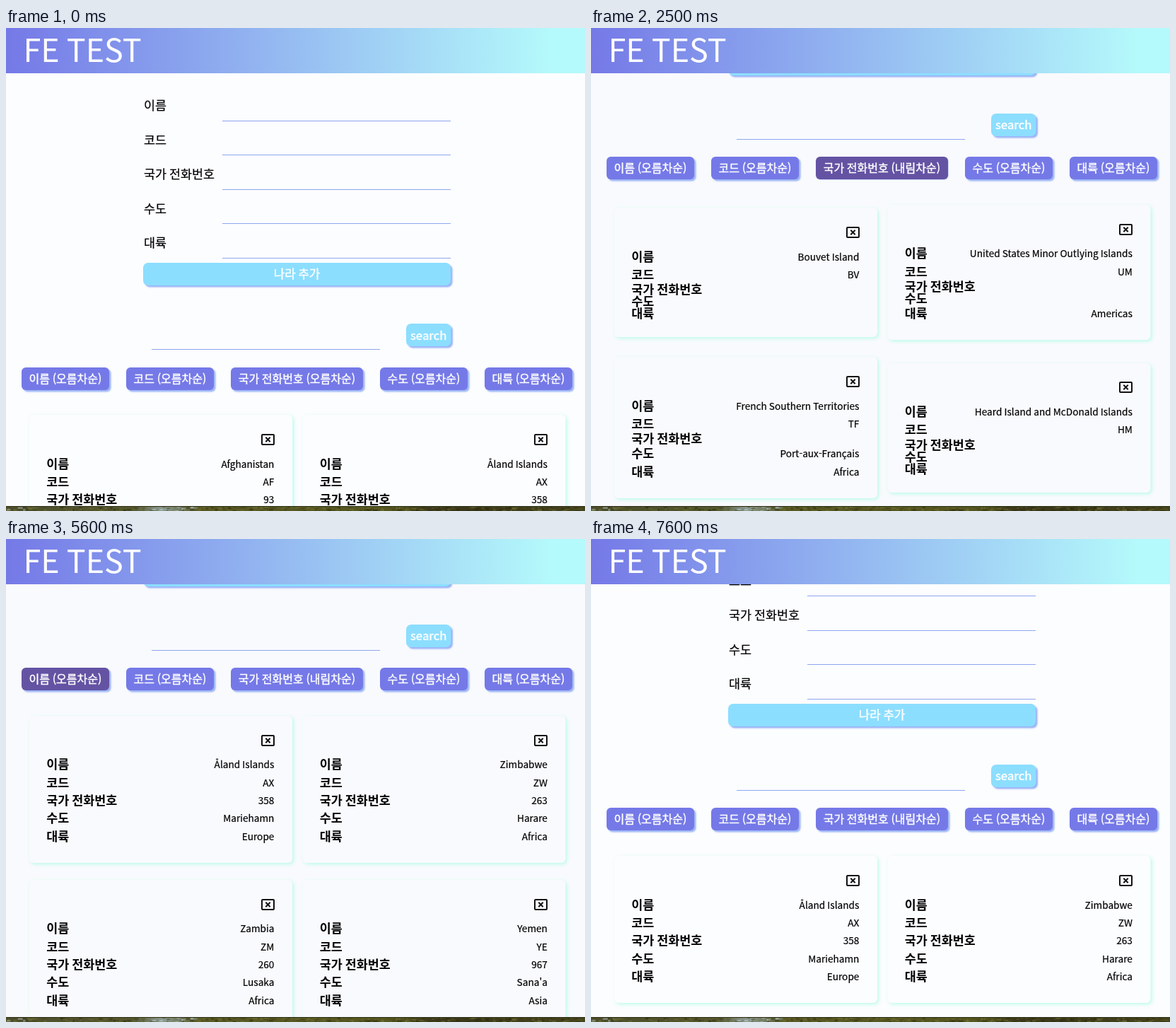
Write an HTML page with a canvas that moves like this. It is 819x683 px and loops after 8000 ms.

```html
<!DOCTYPE html>
<html lang="ko">
<head>
<meta charset="utf-8">
<title>FE TEST</title>
<style>
html, body { margin: 0; width: 100%; height: 100%; overflow: hidden; background: #fcfdff; }
canvas { display: block; }
</style>
</head>
<body>
<canvas id="stage" width="819" height="683"></canvas>
<script>
const ctx = document.getElementById('stage').getContext('2d');
const W = 819, H = 683, LOOP = 8000;
const FAMILY = '"Noto Sans CJK KR", "Noto Sans KR", "Noto Sans", sans-serif';
const LABELS = ['이름', '코드', '국가 전화번호', '수도', '대륙'];
const LINE = '#8ea6f0', SKY = '#8cdeff', BLUE = '#9ab3f5', VIOLET = '#7579e7', DARK = '#6453a3';
const MAX_SCROLL = 297.3;

const LISTS = {
  start: [
    ['Afghanistan', 'AF', '93', 'Kabul', 'Asia'],
    ['Åland Islands', 'AX', '358', 'Mariehamn', 'Europe'],
    ['Albania', 'AL', '355', 'Tirana', 'Europe'],
    ['Algeria', 'DZ', '213', 'Algiers', 'Africa']
  ],
  phoneUp: [
    ['Bouvet Island', 'BV', '', '', ''],
    ['United States Minor Outlying Islands', 'UM', '', '', 'Americas'],
    ['French Southern Territories', 'TF', '', 'Port-aux-Français', 'Africa'],
    ['Heard Island and McDonald Islands', 'HM', '', '', '']
  ],
  phoneDown: [
    ['Uzbekistan', 'UZ', '998', 'Tashkent', 'Asia'],
    ['Kyrgyzstan', 'KG', '996', 'Bishkek', 'Asia'],
    ['Georgia', 'GE', '995', 'Tbilisi', 'Asia'],
    ['Azerbaijan', 'AZ', '994', 'Baku', 'Asia']
  ],
  nameUp: [
    ['Afghanistan', 'AF', '93', 'Kabul', 'Asia'],
    ['Albania', 'AL', '355', 'Tirana', 'Europe'],
    ['Algeria', 'DZ', '213', 'Algiers', 'Africa'],
    ['American Samoa', 'AS', '1684', 'Pago Pago', 'Oceania']
  ],
  nameDown: [
    ['Åland Islands', 'AX', '358', 'Mariehamn', 'Europe'],
    ['Zimbabwe', 'ZW', '263', 'Harare', 'Africa'],
    ['Zambia', 'ZM', '260', 'Lusaka', 'Africa'],
    ['Yemen', 'YE', '967', "Sana'a", 'Asia']
  ]
};

// Each entry changes part of the page state at its time (ms).
// button and card are hovered indexes, down lists labels showing "내림차순".
const STEPS = [
  [0, { scroll: 0, list: 'start', button: -1, card: -1, pressed: false, down: [] }],
  [600, { scroll: 62 }],
  [700, { scroll: 205 }],
  [800, { scroll: MAX_SCROLL, card: 1 }],
  [1000, { card: -1 }],
  [1100, { button: 2 }],
  [1200, { pressed: true }],
  [1300, { pressed: false, list: 'phoneUp', down: [2] }],
  [2500, { pressed: true }],
  [2700, { pressed: false, list: 'phoneDown', down: [] }],
  [3700, { pressed: true }],
  [3800, { pressed: false, list: 'phoneUp', down: [2] }],
  [4400, { button: 1 }],
  [4700, { button: 0 }],
  [4900, { pressed: true }],
  [5000, { pressed: false, list: 'nameUp', down: [0, 2] }],
  [5500, { pressed: true }],
  [5600, { pressed: false, list: 'nameDown', down: [2] }],
  [7000, { button: -1 }],
  [7100, { card: 0 }],
  [7300, { scroll: 275 }],
  [7400, { scroll: 215, card: -1 }],
  [7500, { scroll: 128 }],
  [7600, { scroll: 99.1 }]
];

function stateAt(time) {
  const state = {};
  for (const [at, change] of STEPS) if (at <= time) Object.assign(state, change);
  return state;
}

// Baselines sit on whole pixels; "heavier" thickens the strokes slightly.
function text(str, x, y, size, { color = '#000', align = 'left', weight = 400, heavier = 0 } = {}) {
  ctx.font = `${weight} ${size}px ${FAMILY}`;
  ctx.fillStyle = ctx.strokeStyle = color;
  ctx.textAlign = align;
  ctx.fillText(str, x, Math.round(y));
  if (!heavier) return;
  ctx.lineWidth = heavier;
  ctx.strokeText(str, x, Math.round(y));
}

function box(x, y, w, h, r, fill, shadow, offset, blur) {
  ctx.save();
  ctx.shadowColor = shadow;
  ctx.shadowOffsetX = ctx.shadowOffsetY = offset;
  ctx.shadowBlur = blur;
  ctx.fillStyle = fill;
  ctx.beginPath();
  ctx.roundRect(x, Math.round(y), w, Math.round(h), r);
  ctx.fill();
  ctx.restore();
}

function rule(x, y, w) {
  ctx.fillStyle = LINE;
  ctx.fillRect(x, Math.round(y), w, 1);
}

const onButton = { color: '#fff', align: 'center', heavier: 0.4 };

function form(s) {
  LABELS.forEach((label, i) => {
    const y = i * 48.55 - s;
    text(label, 195, 116.2 + y, 17.4, { heavier: 0.2 });
    rule(306, 130.8 + y, 323);
  });
  box(194, 331.8 - s, 435, 32, 7, SKY, BLUE, 2.5, 2);
  text('나라 추가', 411.5, 354.3 - s, 16.8, onButton);
  rule(206, 454 - s, 323);
  box(566, 418.3 - s, 63.5, 32, 7, SKY, BLUE, 2.5, 2);
  text('search', 597.7, 440.5 - s, 16.8, onButton);
}

function sortButtons(state) {
  const top = Math.round(479.5 - state.scroll);
  let x = 22;
  LABELS.forEach((label, i) => {
    const w = i === 2 ? 187 : 124;
    const hover = state.button === i;
    const press = hover && state.pressed;
    box(x, top, w, 32, 6, hover ? DARK : VIOLET, BLUE, press ? 0.5 : 2.5, press ? 1 : 2);
    const order = state.down.includes(i) ? '내림차순' : '오름차순';
    text(`${label} (${order})`, x + w / 2, top + 22, 16.05, onButton);
    x += w + 24;
  });
}

function closeIcon(cx, cy) {
  ctx.strokeStyle = '#111';
  ctx.lineWidth = 2;
  ctx.beginPath();
  ctx.roundRect(cx - 8.5, cy - 7, 17, 14, 1);
  ctx.moveTo(cx - 3.2, cy - 3.2);
  ctx.lineTo(cx + 3.2, cy + 3.2);
  ctx.moveTo(cx + 3.2, cy - 3.2);
  ctx.lineTo(cx - 3.2, cy + 3.2);
  ctx.stroke();
}

const rowHeight = value => value ? 25.3 : 17;
const cardHeight = data => data.reduce((sum, v) => sum + rowHeight(v), 81.5);

function card(data, x, y, bg, hover) {
  const h = cardHeight(data);
  box(x, y, 372, h, 6, bg, hover ? '#b0b2fa' : '#bdfbea', hover ? 2.5 : 2, hover ? 4 : 5);
  if (hover) {
    ctx.strokeStyle = '#a9def5';
    ctx.lineWidth = 1;
    ctx.beginPath();
    ctx.roundRect(x + 0.5, Math.round(y) + 0.5, 371, Math.round(h) - 1, 6);
    ctx.stroke();
  }
  closeIcon(Math.floor(x + 337) + 0.5, Math.round(y + 34.6));
  let rowTop = y + 57;
  data.forEach((value, i) => {
    const mid = rowTop + rowHeight(value) / 2;
    text(LABELS[i], x + 24.3, mid + 5.8, 17.4, { weight: 700 });
    text(value, x + 346.4, mid + 4.8, 13.65, { align: 'right', heavier: 0.2 });
    rowTop += rowHeight(value);
  });
}

function cards(state, bg) {
  const list = LISTS[state.list];
  let top = 547.3 - state.scroll;
  for (let i = 0; i < list.length; i += 2) {
    const pair = list.slice(i, i + 2);
    const tallest = Math.max(...pair.map(cardHeight));
    pair.forEach((data, j) => {
      const y = top + (tallest - cardHeight(data)) / 2;
      card(data, 33 + j * 386.5, y, bg, state.card === i + j);
    });
    top += tallest + 24;
  }
}

function header() {
  const g = ctx.createLinearGradient(0, 0, W, 0);
  g.addColorStop(0, VIOLET);
  g.addColorStop(0.94, '#b4f9fb');
  ctx.fillStyle = g;
  ctx.fillRect(0, 0, W, 64);
  text('FE TEST', 24.5, 48.4, 44.9, { color: '#fff' });
}

// Soft foliage tones along the bottom edge.
function foliage() {
  const g = ctx.createLinearGradient(0, 0, W, 0);
  g.addColorStop(0, '#4b4d2c');
  g.addColorStop(0.22, '#55582f');
  g.addColorStop(0.27, '#8b9a90');
  g.addColorStop(0.33, '#5a5b25');
  g.addColorStop(0.68, '#55561f');
  g.addColorStop(0.74, '#38351a');
  g.addColorStop(1, '#45431d');
  ctx.save();
  ctx.beginPath();
  ctx.rect(0, 676, W, 7);
  ctx.clip();
  ctx.fillStyle = g;
  ctx.fillRect(0, 676, W, 7);
  const greens = ['#28280d', '#55561f', '#747536', '#45441a'];
  const pale = ['#9fb3bd', '#c3d3dc', '#6d7652', '#3d3d1c'];
  let seed = 7;
  const rnd = () => (seed = seed * 16807 % 2147483647) / 2147483647;
  ctx.globalAlpha = 0.5;
  for (let i = 0; i < 420; i++) {
    const x = rnd() * W, y = 676 + rnd() * 7;
    const tones = x > 195 && x < 270 || x < 60 && i % 3 === 0 ? pale : greens;
    ctx.fillStyle = tones[Math.floor(rnd() * 4)];
    ctx.fillRect(x, y, 2 + rnd() * 5, 1 + rnd() * 2);
  }
  ctx.globalAlpha = 1;
  ctx.fillStyle = '#2c2b14';
  ctx.fillRect(0, 676, W, 1);
  ctx.restore();
}

function draw(time) {
  const state = stateAt(time);
  const bg = state.scroll > 200 ? '#f9fafd' : '#fcfdff';
  ctx.fillStyle = bg;
  ctx.fillRect(0, 0, W, H);
  form(state.scroll);
  sortButtons(state);
  cards(state, bg);
  header();
  foliage();
}

const start = performance.now();
function tick() {
  draw((performance.now() - start) % LOOP);
  requestAnimationFrame(tick);
}
tick();
</script>
</body>
</html>
```
